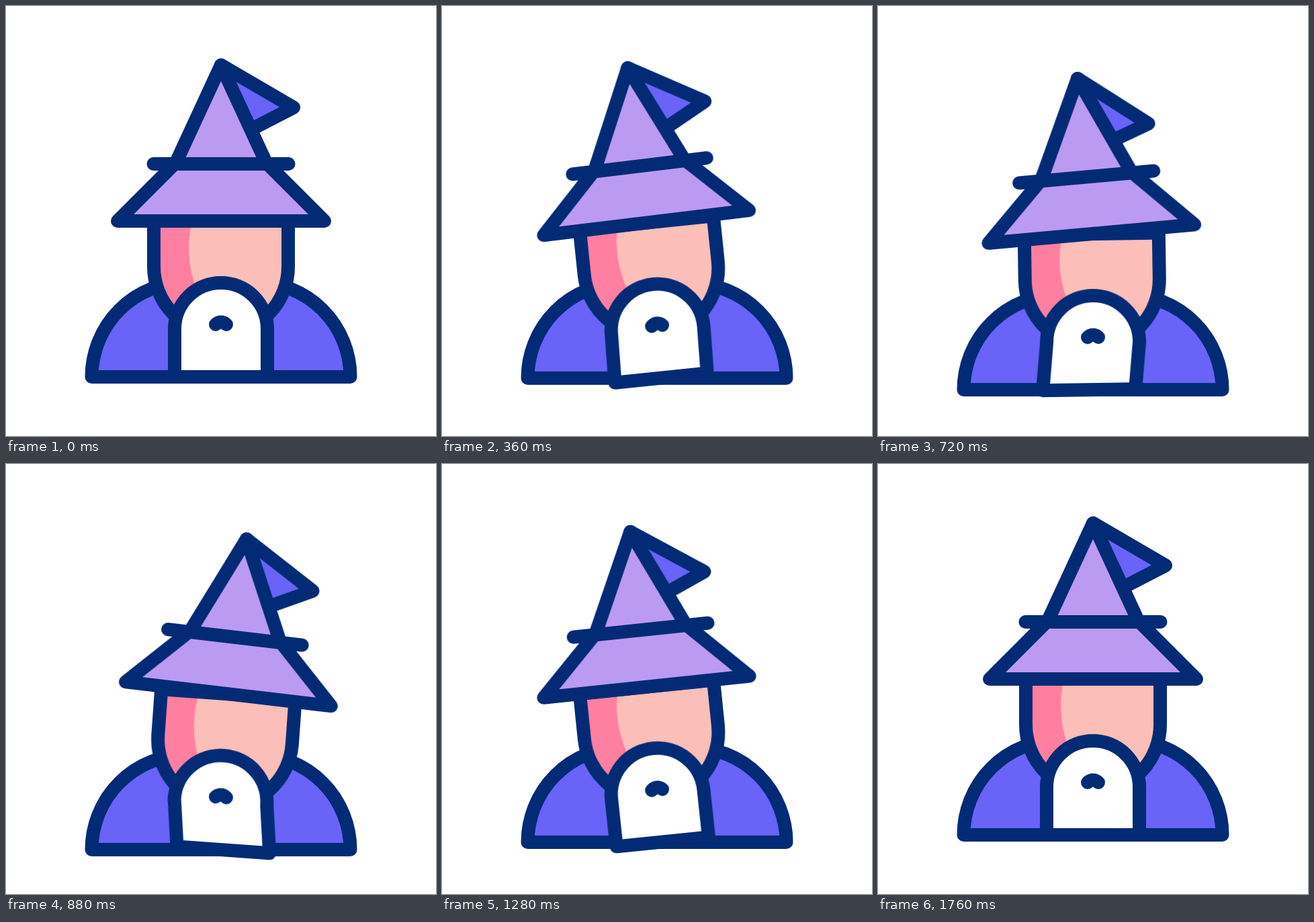
Animation, 640 px wide and 640 px high, one loop 1800 ms. Source, as an HTML page without scripts:

```html
<!DOCTYPE html>
<html lang="en">
<head>
<meta charset="utf-8">
<title>Wizard</title>
<style>
  html, body { margin: 0; width: 100%; height: 100%; overflow: hidden; background: #fff; }
  svg { display: block; width: 100%; height: 100%; }

  .line { stroke: #032b75; stroke-width: 20; stroke-linecap: round; stroke-linejoin: round; }
  .robe { fill: #6963f8; }
  .hat-fill { fill: #bb9af2; }
  .skin { fill: #fcbeb8; }
  .shade { fill: #ff7fa1; }
  .white { fill: #fff; }
  .none { fill: none; }

  .wizard, .head, .hat, .flag, .beard {
    animation: 1.8s cubic-bezier(.5, 0, .5, 1) infinite;
  }
  .wizard { animation-name: bob; }
  .head { animation-name: nod; transform-origin: 320px 473px; }
  .hat { animation-name: tilt; transform-origin: 320px 320px; }
  .flag { animation-name: flap; transform-origin: 320px 88px; }
  .beard { animation-name: sway; }

  @keyframes bob {
    0%, 11.1%, 91.1%, 100% { transform: translateY(0); }
    51.1% { transform: translateY(22px); }
  }
  @keyframes nod {
    0%, 11.1%, 82.6%, 100% { transform: rotate(0deg); }
    20%, 31.1%, 73% { transform: rotate(-5.9deg); }
    48.9% { transform: rotate(4.1deg); }
  }
  /* the hat trails behind the head */
  @keyframes tilt {
    0%, 11.1%, 89%, 100% { transform: rotate(0deg); }
    20%, 31.1% { transform: rotate(-1deg); }
    40% { transform: rotate(-4.3deg); }
    48.9% { transform: rotate(2.6deg); }
    62.2% { transform: rotate(1.4deg); }
    80% { transform: rotate(-1.7deg); }
  }
  @keyframes flap {
    0%, 20%, 29%, 91%, 100% { transform: rotate(0deg); }
    40% { transform: rotate(7.3deg); }
    48.9% { transform: rotate(1.1deg); }
    62.2% { transform: rotate(-1.5deg); }
    80% { transform: rotate(9.4deg); }
  }
  /* only the lower corners of the beard swing */
  @keyframes sway {
    0%, 11.1%, 31.1%, 75.6%, 89%, 100% { d: path("M251 552L251 481A69 69 0 0 1 389 481L389 552Z"); }
    20% { d: path("M249 552L251 481A69 69 0 0 1 389 481L387 552Z"); }
    40% { d: path("M244 552L251 481A69 69 0 0 1 389 481L382 552Z"); }
    48.9% { d: path("M260 552L251 481A69 69 0 0 1 389 481L398 552Z"); }
    80% { d: path("M248 552L251 481A69 69 0 0 1 389 481L386 552Z"); }
  }
</style>
</head>
<body>
<svg viewBox="0 0 640 640">
  <g class="wizard">
    <path class="line robe" d="M127.5 552A141 141 0 0 1 268.5 411H371.5A141 141 0 0 1 512.5 552Z"/>
    <g class="head">
      <path class="skin" d="M220 320V388A100 100 0 0 0 420 388V320Z"/>
      <path class="shade" d="M220 320V388A100 100 0 0 0 282 480V418Q265 368 277 320Z"/>
      <path class="line none" d="M220 320V388A100 100 0 0 0 420 388V320Z"/>
      <path class="line white beard" d="M251 552L251 481A69 69 0 0 1 389 481L389 552Z"/>
      <path class="line none" d="M312 474Q320 467 328 474"/>
      <g class="hat">
        <path class="line robe flag" d="M320 88L428 151L342 195.5Z"/>
        <path class="line hat-fill" d="M320 88L252 235H388Z"/>
        <path class="line hat-fill" d="M251 235L166 320H474L389 235Z"/>
        <path class="line none" d="M219.5 235H420.5"/>
      </g>
    </g>
  </g>
</svg>
</body>
</html>
```
